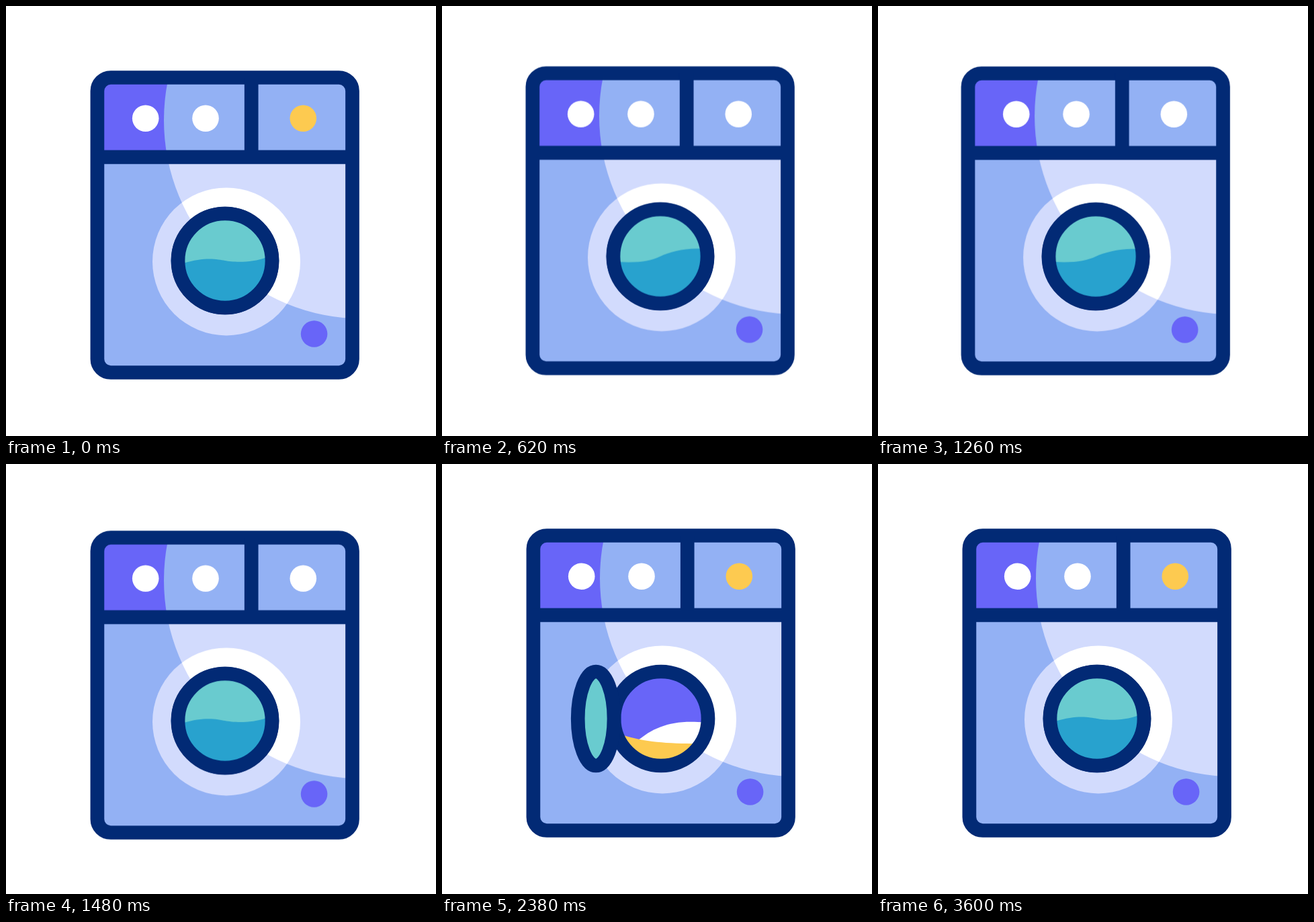
These frames come from a looping animation (640 by 640 pixels, 3.62 s). An HTML page without scripts:

```html
<!DOCTYPE html>
<html lang="en">
<head>
<meta charset="utf-8">
<title>Washing machine</title>
<style>
  :root {
    --navy: #022a75;
    --blue: #93b1f4;
    --pale: #d2dbfd;
    --violet: #6865f8;
    --teal: #69cbcf;
    --water: #28a2ce;
    --yellow: #fdca50;
    --closed: path("M256 379C256 340.3 287.3 309 326 309S396 340.3 396 379 364.7 449 326 449 256 417.7 256 379Z");
    --open: path("M256 379C256 340.3 239.2 309 218.5 309S181 340.3 181 379 197.8 449 218.5 449 256 417.7 256 379Z");
    --calm: path("M264 383C295 373 315 377 326 379S365 383 388 374V455H264Z");
    --right: path("M264 389C295 391 312 387 326 379S365 364 388 366V455H264Z");
    --left: path("M264 367C287 365 312 371 326 379S357 391 388 389V455H264Z");
  }
  html, body { margin: 0; width: 100%; height: 100%; overflow: hidden; background: #fff; }
  svg { display: block; width: 100%; height: 100%; }

  .navy { fill: var(--navy); }
  .blue { fill: var(--blue); }
  .pale { fill: var(--pale); }
  .violet { fill: var(--violet); }
  .teal { fill: var(--teal); }
  .yellow { fill: var(--yellow); }
  .white { fill: #fff; }
  .frame { fill: none; stroke: var(--navy); stroke-width: 20.7; stroke-linejoin: round; }

  .machine, .light, .door, .level, .wave { animation: 3.62s linear infinite; }
  .machine { animation-name: shake; }
  .light { animation-name: blink; animation-timing-function: step-end; }
  .door { d: var(--closed); animation-name: swing; animation-timing-function: ease-in-out; }
  .level { animation-name: drain; }
  .wave { fill: var(--water); d: var(--calm); animation-name: slosh; animation-timing-function: ease-in-out; }

  /* Drop to the orbit, circle three times, return to rest */
  @keyframes shake {
    0%, 10.22% { transform: rotate(0deg) translate(0, 0) rotate(0deg); }
    12.93% { transform: rotate(0deg) translate(0, 6.5px) rotate(0deg); }
    39.72% { transform: rotate(1080deg) translate(0, 6.5px) rotate(-1080deg); }
    41.99%, 100% { transform: rotate(1080deg) translate(0, 0) rotate(-1080deg); }
  }
  @keyframes blink {
    0%, 55.25% { fill: var(--yellow); }
    5.52% { fill: #fff; }
  }
  @keyframes slosh {
    0%, 10.22%, 41.44%, 100% { d: var(--calm); }
    13.92%, 21.93%, 29.97%, 38.04% { d: var(--left); }
    17.93%, 25.97%, 34% { d: var(--right); }
  }
  @keyframes drain {
    0%, 42%, 99.4%, 100% { transform: translateY(0); }
    55.8%, 91.2% { transform: translateY(66px); }
  }
  @keyframes swing {
    0%, 55%, 99.2%, 100% { d: var(--closed); }
    68.8%, 83.1% { d: var(--open); }
  }
</style>
</head>
<body>
<svg viewBox="0 0 640 640">
  <defs>
    <clipPath id="shine"><circle cx="530.5" cy="170" r="295.5"/></clipPath>
    <clipPath id="drum"><circle cx="326" cy="379" r="65"/></clipPath>
    <clipPath id="glass"><path class="door"/></clipPath>
  </defs>

  <g class="machine">
    <rect class="violet" x="141" y="111" width="370" height="114"/>
    <rect class="blue" x="141" y="225" width="370" height="316"/>
    <circle class="pale" cx="328" cy="380.4" r="110"/>
    <g clip-path="url(#shine)">
      <rect class="blue" x="141" y="111" width="370" height="114"/>
      <rect class="pale" x="141" y="225" width="370" height="316"/>
      <circle class="white" cx="328" cy="380.4" r="110"/>
    </g>

    <rect class="frame" x="135.9" y="106.5" width="379.6" height="439" rx="20"/>
    <path class="frame" d="M136 224.8H515M365.2 107V225"/>

    <circle class="white" cx="207.7" cy="167.2" r="19.8"/>
    <circle class="white" cx="297" cy="167.2" r="19.8"/>
    <circle class="light" cx="442.3" cy="167.2" r="19.8"/>
    <circle class="violet" cx="458.6" cy="488" r="19.8"/>

    <g clip-path="url(#drum)">
      <circle class="violet" cx="326" cy="379" r="66"/>
      <path class="white" d="M290 413C315 391 345 380 392 385V420H300Z"/>
      <path class="yellow" d="M260 401C300 414 335 417 392 416V450H260Z"/>
    </g>
    <circle class="frame" cx="326" cy="379" r="70"/>

    <path class="door teal"/>
    <g clip-path="url(#glass)">
      <g class="level"><path class="wave"/></g>
    </g>
    <path class="door frame"/>
  </g>
</svg>
</body>
</html>
```
